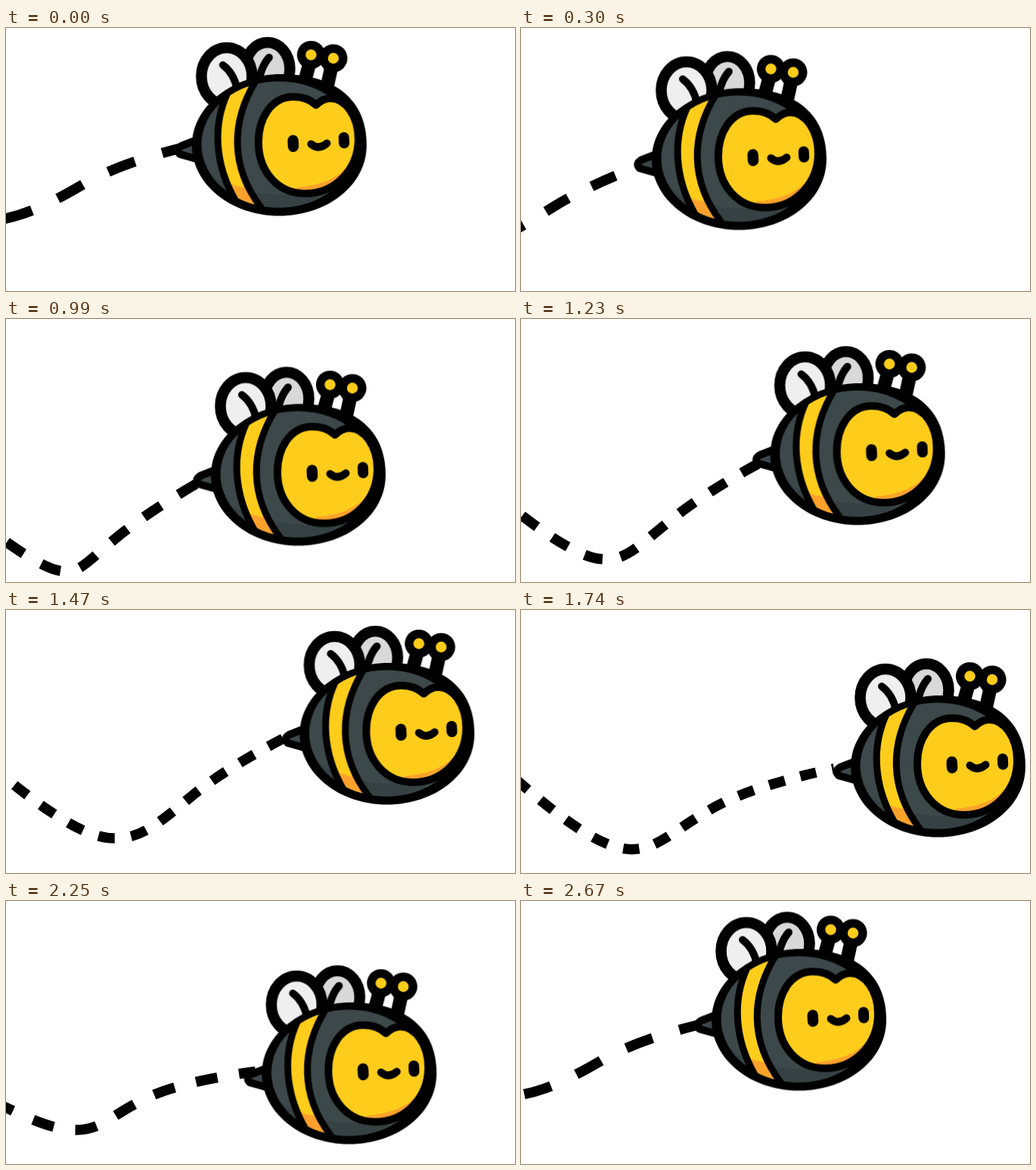
These frames come from a looping animation (673 by 348 pixels, 2.7 s). An HTML page without scripts:

```html
<!DOCTYPE html>
<html lang="en">
<head>
<meta charset="utf-8">
<title>Flying bee</title>
<style>
  html, body { margin: 0; width: 100%; height: 100%; overflow: hidden; background: #fff; }
  svg { display: block; width: 100vw; height: 100vh; }

  .drift { animation: drift 2700ms linear infinite; }
  .bob { animation: bob 2700ms cubic-bezier(.364, 0, .636, 1) -2610ms infinite; }
  .trail { fill: none; stroke: #000; stroke-width: 13.5; animation: trail 2700ms linear infinite; }

  .line { fill: none; stroke: #000; stroke-width: 10; stroke-linecap: round; stroke-linejoin: round; }
  .thin { stroke-width: 9; }
  .stalk { stroke-width: 18; stroke-linecap: butt; }
  .dark { fill: #3c4849; }
  .shade { fill: #354142; }
  .yellow { fill: #fecd1b; }
  .orange { fill: #fca22c; }

  /* Straight glides joined by quadratic turns at both ends */
  @keyframes drift {
    0%, 100% { transform: translateX(0); }
    9.26% { transform: translateX(-62px); animation-timing-function: cubic-bezier(.333, .667, .667, 1); }
    16.3% { transform: translateX(-86px); animation-timing-function: cubic-bezier(.333, 0, .667, .333); }
    23.7% { transform: translateX(-61px); }
    58.52% { transform: translateX(169px); animation-timing-function: cubic-bezier(.333, .667, .667, 1); }
    64.81% { transform: translateX(190px); animation-timing-function: cubic-bezier(.333, 0, .667, .333); }
    70.37% { transform: translateX(173px); }
    74.44% { transform: translateX(147.5px); }
    80% { transform: translateX(111px); }
  }

  @keyframes bob {
    0%, 100% { transform: translateY(-3px); }
    21.56% { transform: translateY(71.5px); }
    52.41% { transform: translateY(8.7px); }
    70.2% { transform: translateY(98px); }
  }

  /* Path runs from the tail through the slope and the dip to the far left */
  @keyframes trail {
    0%, 100% {
      d: path("M240 157S158 174 100 208S5 257-50 257S-130 240-220 180");
      stroke-dasharray: 37.7px 37.7px; stroke-dashoffset: 3px;
    }
    9.26% {
      d: path("M178 168S103 191 50 222S-45 280-95 280S-160 260-240 200");
      stroke-dasharray: 35px 35px; stroke-dashoffset: 77px;
    }
    16.3% {
      d: path("M156 203S82 236 38 268S-40 325-80 325S-150 300-230 230");
      stroke-dasharray: 32.8px 32.8px; stroke-dashoffset: 114px;
    }
    22.22% {
      d: path("M165 228S88 265 50 292S-15 350-45 350S-110 320-190 250");
      stroke-dasharray: 31px 31px; stroke-dashoffset: 99px;
    }
    36.67% {
      d: path("M262 212S193 251 150 286S100 334 78 334S20 312-60 250");
      stroke-dasharray: 27px 27px; stroke-dashoffset: -13px;
    }
    54.44% {
      d: path("M380 163S298 203 247 245S178 302 143 302S60 274-30 198");
      stroke-dasharray: 21.8px 21.8px; stroke-dashoffset: -103px;
    }
    60% {
      d: path("M416 180S313 213 262 248S190 305 150 305S62 277-30 198");
      stroke-dasharray: 20.3px 20.3px; stroke-dashoffset: -109px;
    }
    70.37% {
      d: path("M411 249S312 252 253 275S170 332 142 332S60 300-35 205");
      stroke-dasharray: 22.8px 22.8px; stroke-dashoffset: -111px;
    }
    74.44% {
      d: path("M395 249S300 252 238 275S155 334 130 334S50 300-40 205");
      stroke-dasharray: 24.5px 24.5px; stroke-dashoffset: -99.5px;
    }
    83.33% {
      d: path("M330 226S240 236 190 259S128 303 93 303S20 285-80 232");
      stroke-dasharray: 28.9px 28.9px; stroke-dashoffset: -51px;
    }
  }
</style>
</head>
<body>
<svg viewBox="0 0 673 348" preserveAspectRatio="none">
  <defs>
    <ellipse id="body" cx="362" cy="155" rx="102.5" ry="83.5"/>
    <path id="face" d="M411 103C402 94 390 92 381 92C351 92 335 122 335 152C335 190 360 220 397 220C437 220 467 187 467 148C467 118 450 94 430 94C422 94 416 98 411 103Z"/>
    <clipPath id="inBody"><use href="#body"/></clipPath>
    <clipPath id="inFace"><use href="#face"/></clipPath>
    <g id="knob">
      <circle r="18.6"/>
      <circle class="yellow" r="7.2"/>
    </g>
  </defs>

  <path class="trail" d="M240 157S158 174 100 208S5 257-50 257S-130 240-220 180"/>

  <g class="drift"><g class="bob"><g transform="translate(-1 -1)">
    <g stroke="#000" stroke-width="14.5">
      <ellipse cx="347" cy="55" rx="29.5" ry="35" fill="#d9d9d9"/>
      <ellipse cx="293" cy="65" rx="33.5" ry="38" fill="#efefef"/>
    </g>
    <path class="line" d="M288 50Q302 60 307 82M349 40Q338 52 334 78"/>

    <path class="line stalk" d="M403 46L396 72M432 50L425 82"/>
    <use href="#knob" x="404.5" y="36.5"/>
    <use href="#knob" x="434" y="41"/>

    <path class="line" style="fill:#3c4849" d="M256 148L233 157Q225 162 231 168L256 175Z"/>

    <path d="M247 156C247 104 302 62 365 62C439 62 478 98 478 156C478 208 427 249.500 362 249.500C299 249.500 247 208 247 156Z"/>
    <use href="#body" class="dark"/>
    <g clip-path="url(#inBody)">
      <path class="shade" d="M255 175C285 220 340 224 415 221L400 250H280Z"/>
      <path class="yellow" d="M297 80C275 125 276 180 306 232L338 238C300 190 296 125 332 70Z"/>
      <path class="orange" d="M296 206Q308 212 321 212L338 240H306Z"/>
    </g>
    <path class="line thin" d="M294 87C275 128 276 180 305 230M332 70C298 125 298 185 338 238"/>

    <use href="#face" class="yellow"/>
    <path class="orange" clip-path="url(#inFace)" d="M467 150C463 185 436 208 385 212V230H470Z"/>
    <use href="#face" class="line"/>

    <rect x="373.7" y="142.5" width="14.4" height="22.5" rx="7.2" transform="rotate(-3 381 154)"/>
    <rect x="441" y="138.8" width="14" height="21.5" rx="7" transform="rotate(-3 448 149)"/>
    <path class="line" d="M404.5 154.5Q415 163 425.5 153.5"/>
  </g></g></g>
</svg>
</body>
</html>
```
